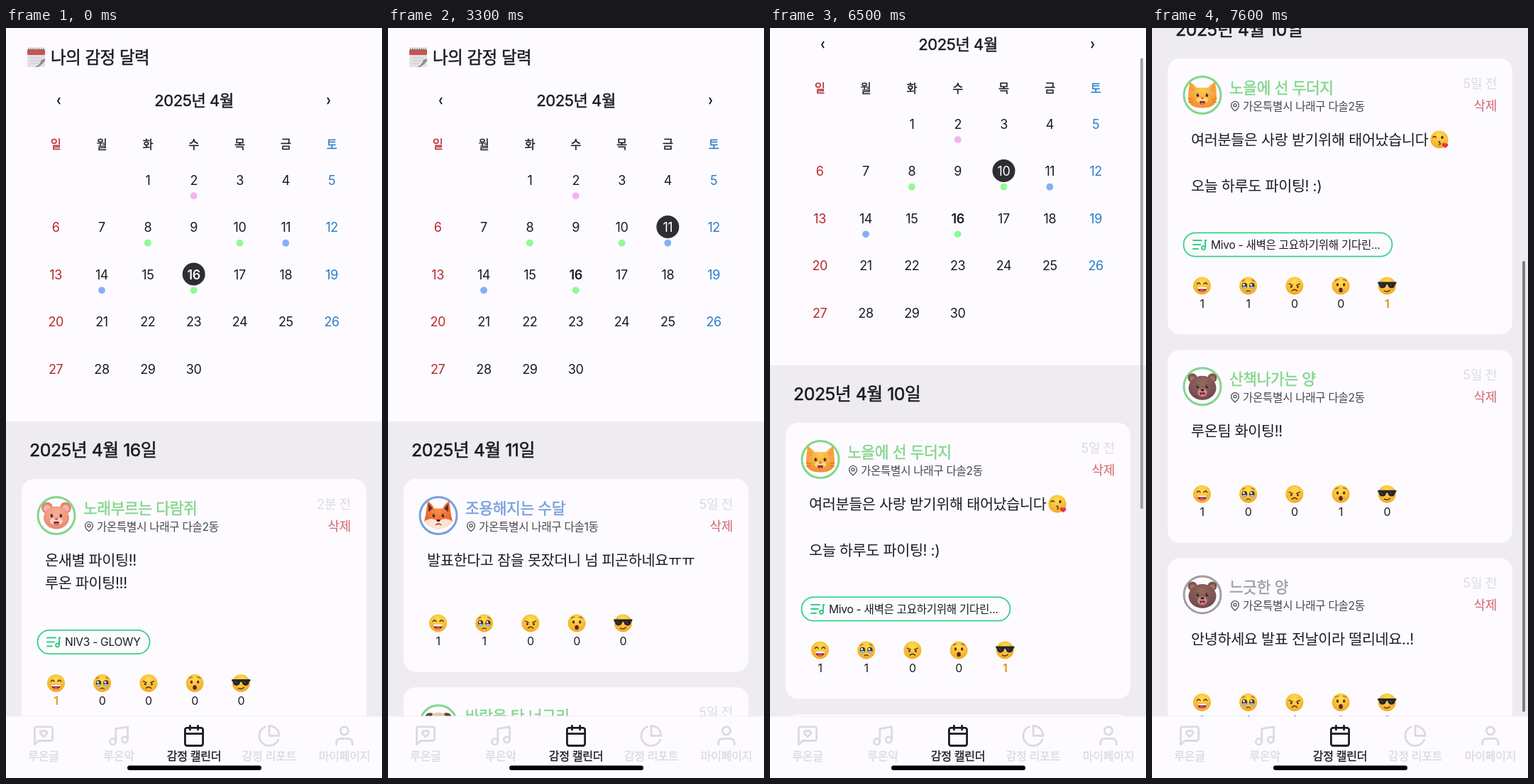
These frames come from a looping animation (530 by 1056 pixels, 7.7 s). An HTML page:

```html
<!DOCTYPE html>
<html lang="ko">
<head>
<meta charset="utf-8">
<style>
html, body { margin: 0; width: 100%; height: 100%; overflow: hidden; background: #fdfbff; }
svg { display: block; width: 530px; height: 1056px; }
text { font-family: Inter, 'Noto Sans CJK KR', 'Noto Sans CJK', 'Noto Sans KR', sans-serif; letter-spacing: -.02em; white-space: pre; }
.medium { stroke-width: .022em; stroke-linejoin: round; }
.card { opacity: var(--o); }
.line { fill: none; stroke-linecap: round; stroke-linejoin: round; }
</style>
</head>
<body>
<svg id="stage" viewBox="0 0 530 1056"></svg>
<script>
const LOOP = 7700, FRAME = 100;
const INK = '#1c1b1f', PAPER = '#fdfbff', PANEL = '#eeecef', RED = '#b9282c', BLUE = '#2b7ccb';
const GREEN = '#83d68c', SKY = '#789fdb', GREY = '#a09ea2';
const stage = document.getElementById('stage');

// drawing helpers
const oval = (x, y, rx, ry, fill) => `<ellipse cx="${x}" cy="${y}" rx="${rx}" ry="${ry}" fill="${fill}"/>`;
const dot = (x, y, r, fill) => oval(x, y, r, r, fill);
const pair = (x, y, rx, ry, fill) => oval(-x, y, rx, ry, fill) + oval(x, y, rx, ry, fill);
const box = (x, y, w, h, r, fill, more = '') => `<rect x="${x}" y="${y}" width="${w}" height="${h}" rx="${r}" fill="${fill}" ${more}/>`;
const area = (d, fill) => `<path d="${d}" fill="${fill}"/>`;
const line = (d, color, w) => `<path class="line" d="${d}" stroke="${color}" stroke-width="${w}"/>`;
const at = (x, y, inner) => `<g transform="translate(${x} ${y})">${inner}</g>`;
const put = (id, x, y) => `<use href="#${id}" x="${x}" y="${y}"/>`;
const label = (x, cy, size, str, fill = INK, anchor = 'start', more = '') =>
  `<text x="${x}" y="${cy + size * .37}" font-size="${size}" fill="${fill}" text-anchor="${anchor}" ${more}>${str}</text>`;
// a thin outline gives the weight between regular and bold
const medium = (x, cy, size, str, fill = INK, anchor = 'start', more = '') =>
  label(x, cy, size, str, fill, anchor, `class="medium" stroke="${fill}" ${more}`);
const ring = (x, y, r, color, w) => `<circle cx="${x}" cy="${y}" r="${r}" fill="none" stroke="${color}" stroke-width="${w}"/>`;
const fade = (id, a, b) => `<radialGradient id="${id}" cx=".5" cy=".3" r=".75"><stop offset="0" stop-color="${a}"/><stop offset="1" stop-color="${b}"/></radialGradient>`;

// reaction faces
const ball = dot(0, 0, 12.5, 'url(#yellow)');
const DARK = '#4a2f25';
const faces = {
  grin: ball + line('M-7 -2.5q2.2 -3.4 4.4 0M2.6 -2.5q2.2 -3.4 4.4 0', DARK, 1.5) +
    area('M-7 2H7Q6 8.6 0 8.6T-7 2z', '#7c1f2d') + area('M-6.8 2H6.8L6 4.4H-6z', '#fff') + oval(0, 7, 3.2, 1.4, '#f0566b'),
  moved: ball + pair(5.2, 0, 3.7, 4.2, DARK) + pair(5.2, 2.6, 3.1, 1.8, '#7fc4f2') +
    dot(-6.2, -1.6, 1.5, '#fff') + dot(4.2, -1.6, 1.5, '#fff') +
    line('M-8.5 -6.5l3.6 -2M8.5 -6.5l-3.6 -2', '#8a5a24', 1.1) + line('M-2.6 7.8q2.6 -2 5.2 0', DARK, 1.2),
  angry: ball + line('M-7.6 -2.8l4.8 2M7.6 -2.8l-4.8 2', DARK, 1.3) + pair(4.6, 1.2, 1.4, 1.7, DARK) + line('M-3.6 7q3.6 -3.6 7.2 0', DARK, 1.4),
  hush: ball + pair(4.6, -1.6, 1.6, 2.2, DARK) + oval(0, 6, 2.8, 3.3, '#5b2526') +
    line('M-7.6 -7q1.8 -2.2 4.2 -1.5M7.6 -7q-1.8 -2.2 -4.2 -1.5', '#8a5a24', 1.2),
  cool: ball + area('M-13 -5.5H13V-2.8L11.5 -2.3Q11 3.4 6.5 3.4T1 -1.8H-1Q-2 3.4 -6.5 3.4T-11.5 -2.3L-13 -2.8z', '#26252b') +
    line('M-8.5 -3l2.5 3.4M4 -3l2.5 3.4', '#55535e', 1) + line('M-4 7q4.5 2.6 8 -1', DARK, 1.4),
  kiss: ball + line('M-9 -3q2.3 -2.4 4.5 0', DARK, 1.5) + oval(4, -3, 1.6, 2.2, DARK) +
    line('M-1 3q3 0 1 1.8q3 1 0 2.8', DARK, 1.3) + area('M8 12q-5 -3 -4 -6q2 -3 4 0q3 -2 4.5 1q0 3 -4.5 5z', '#e7354b')
};

// animal portraits
const eyes = pair(6.5, 0, 1.8, 2.4, '#2d1b1d') + dot(-6, -1, .7, '#fff') + dot(7, -1, .7, '#fff');
const smile = area('M-4 8.5H4Q3.5 13.4 0 13.4T-4 8.5z', '#842338') + oval(0, 12, 2.2, 1.2, '#f3788a');
const catHead = 'M-18 -18Q-15 -18 -8 -10.5H8Q15 -18 18 -18Q20 -6 20 4Q20 18 0 18T-20 4Q-20 -6 -18 -18z';
const animals = {
  mouse: pair(13, -11, 8, 8, '#df8771') + pair(13, -10, 5, 5, '#f8b4ac') + oval(0, 3, 18, 16, 'url(#peach)') +
    pair(4, 8, 5, 4, '#fad3c5') + eyes + oval(0, 5, 2.2, 1.6, '#d95a73') + smile,
  cat: area(catHead, 'url(#gold)') + area('M-16 -14l6 6l-6 4zM16 -14l-6 6l6 4z', '#f49a4c') +
    pair(3.6, 7, 4.4, 3.4, '#ffd284') + eyes + oval(0, 4.5, 1.8, 1.3, '#d9603f') + smile +
    line('M-20 5l6 1M-20 10l6 -1M20 5l-6 1M20 10l-6 -1', '#c6702b', .9),
  fox: area('M-15 -20Q-9 -17 -6 -10H6Q9 -17 15 -20Q17 -9 18 0L20 8Q12 18 0 19Q-12 18 -20 8L-18 0Q-17 -9 -15 -20z', 'url(#rust)') +
    area('M-14 -17l6 7l-6 5zM14 -17l-6 7l6 5z', '#6a2b2b') + area('M-20 8Q-10 1 0 8Q10 1 20 8Q11 19 0 19T-20 8z', '#ffe3cf') +
    eyes + oval(0, 7, 2.5, 1.8, '#35201f') + line('M-3.4 13q3.4 -3 6.8 0', '#7a2a2e', 1.4),
  bear: pair(14, -12, 6.5, 6.5, '#7d564b') + pair(14, -11, 3.5, 3.5, '#a8736b') + oval(0, 2, 19.5, 17, 'url(#cocoa)') +
    oval(0, 8.5, 6.6, 6, '#c98f86') + eyes + oval(0, 5, 2.6, 1.7, '#35201f') + smile,
  dog: oval(0, 2, 17, 18, '#e9c6a0') + area('M-8 -15Q-20 -18 -20 -2Q-15 2 -11 -6zM8 -15Q20 -18 20 -2Q15 2 11 -6z', '#5d423f') +
    eyes + oval(0, 5, 3.6, 2.4, '#35201f') + smile
};

const define = set => Object.entries(set).map(([id, art]) => `<g id="${id}">${art}</g>`).join('');
const defs = '<defs>' + fade('yellow', '#ffdc52', '#f4a51f') + fade('peach', '#f8b296', '#e58569') +
  fade('gold', '#ffcb4c', '#f28a2e') + fade('rust', '#fb9142', '#e2512b') + fade('cocoa', '#96695a', '#6b4653') +
  define(faces) + define(animals) + '</defs>';

// posts
const reactions = ['grin', 'moved', 'angry', 'hush', 'cool'];
const pin = `<g transform="translate(117 67) scale(.67) translate(-12 -12)">` +
  line('M20 10c0 6-8 12-8 12s-8-6-8-12a8 8 0 0 1 16 0z', '#555358', 2) + ring(12, 10, 3, '#555358', 2) + '</g>';
const tune = line('M58 -6H70M58 0H68M58 6H65M75 -6V4M75 -6h1.5', '#35cf83', 2) + ring(72.5, 4.5, 2.4, '#35cf83', 2);

function post(p) {
  const base = 114 + 32.5 * (p.text.length - 1);
  const row = base + (p.song ? 141 : 89);
  p.height = row + 68.5;
  let out = box(22, 0, 486, p.height, 17, PAPER, 'class="card"') +
    ring(71, 51.5, 26, p.color, 3) + put(p.face, 71, 51.5) +
    medium(109, 41, 21.5, p.name, p.color) + pin +
    label(128, 67, 15.6, p.place, '#49474c') +
    label(486, 35, 18, p.ago, '#dddbdf', 'end') + label(486, 66, 18, '삭제', '#d4646e', 'end');
  p.text.forEach((s, i) => out += label(55, 114 + 32.5 * i, 20.8, s));
  if (p.kiss) out += put('kiss', 405, 114);
  if (p.song) {
    out += at(0, base + 83, box(44.5, -16.7, p.wide, 33.4, 16.7, 'none', 'stroke="#35d18a" stroke-width="1.8"') +
      tune + label(83, 0, 15.6, p.song));
  }
  reactions.forEach((id, i) => {
    const x = 70.5 + 65.2 * i, mine = p.mine === i;
    out += put(id, x, row) + label(x, row + 25, 16, p.counts[i], mine ? '#e0a02c' : INK, 'middle', mine ? 'font-weight="700"' : '');
  });
  return out;
}

const PLACE = '가온특별시 나래구 다솔2동';
const posts = {
  16: [{ face: 'mouse', color: GREEN, name: '노래부르는 다람쥐', place: PLACE, ago: '2분 전', text: ['온새별 파이팅!!', '루온 파이팅!!!'],
    song: 'NIV3 - GLOWY', wide: 158, counts: [1, 0, 0, 0, 0], mine: 0 }],
  10: [
    { face: 'cat', color: GREEN, name: '노을에 선 두더지', place: PLACE, ago: '5일 전', kiss: true,
      text: ['여러분들은 사랑 받기위해 태어났습니다', '', '오늘 하루도 파이팅! :)'],
      song: 'Mivo - 새벽은 고요하기위해 기다린...', wide: 294, counts: [1, 1, 0, 0, 1], mine: 4 },
    { face: 'bear', color: GREEN, name: '산책나가는 양', place: PLACE, ago: '5일 전', text: ['루온팀 화이팅!!'], counts: [1, 0, 0, 1, 0] },
    { face: 'bear', color: GREY, name: '느긋한 양', place: PLACE, ago: '5일 전', text: ['안녕하세요 발표 전날이라 떨리네요..!'], counts: [0, 1, 1, 0, 0] }
  ],
  11: [
    { face: 'fox', color: SKY, name: '조용해지는 수달', place: '가온특별시 나래구 다솔1동', ago: '5일 전',
      text: ['발표한다고 잠을 못잤더니 넘 피곤하네요ㅠㅠ'], counts: [1, 1, 0, 0, 0] },
    { face: 'dog', color: GREEN, name: '바람을 탄 너구리', place: PLACE, ago: '5일 전', text: [''], counts: [0, 0, 0, 0, 0] }
  ],
  14: [{ face: 'cat', color: SKY, name: '잠잠해진 두더지', place: '가온특별시 마루구 바람2동', ago: '2일 전',
    text: ['온새별 안녕..이제 마지막 만남 하러 가는길'], counts: [0, 0, 0, 0, 0] }]
};

function list(day) {
  let y = 635;
  const cards = posts[day].map(p => {
    const g = at(0, y, post(p));
    y += p.height + 21.7;
    return g;
  });
  return `<g id="list${day}">${cards.join('')}</g>`;
}

// calendar
const colX = c => 70.2 + 64.83 * c, rowY = r => 214 + 66.55 * r;
const cell = d => [colX((d + 1) % 7), rowY(Math.floor((d + 1) / 7))];
const tint = c => c === 0 ? RED : c === 6 ? BLUE : INK;
const moods = { 2: '#f5b4f1', 8: '#8ffb93', 10: '#8ffb93', 11: '#86aff6', 14: '#86aff6', 16: '#8ffb93' };

function calendar() {
  let out = at(29, 27,
    box(1, 3, 25, 25, 1.5, '#e4e2e6') + box(1, 3, 25, 8, 1.5, '#c8564c') +
    line('M5 15H22M5 19H22M5 23H14', '#cac7cd', 1) + area('M12 28Q19 25 21 18L26 16V19Q22 25 16 28z', '#8e8c92') +
    line(Array.from({ length: 8 }, (_, i) => `M${3 + i * 3} 1V5`).join(''), '#77757b', 1.2)) +
    medium(63, 41, 23.5, '나의 감정 달력') +
    medium(265, 101.5, 22.1, '2025년 4월', INK, 'middle') +
    line('M75.5 98.5L73 102.5L75.5 106.5M453.5 98.5L456 102.5L453.5 106.5', INK, 1.9);
  [...'일월화수목금토'].forEach((s, c) => out += medium(colX(c), 164, 16.5, s, tint(c), 'middle'));
  out += `<circle id="mark" r="16" fill="#2f2d32"/>`;
  for (let d = 1; d <= 30; d++) {
    const [x, y] = cell(d);
    out += label(x, y, 18, d, tint((d + 1) % 7), 'middle', `id="day${d}" font-weight="${d === 16 ? 600 : 400}"`);
    if (moods[d]) out += dot(x, y + 22.2, 4.9, moods[d]);
  }
  return out;
}

// bottom bar
const tabs = [
  ['루온글', c => line('M21 15a2 2 0 0 1-2 2H7l-4 4V5a2 2 0 0 1 2-2h14a2 2 0 0 1 2 2zM14.8 7.5a1.84 1.84 0 0 0-2.6 0l-.2.3-.3-.3a1.84 1.84 0 1 0-2.4 2.8L12 13l2.7-2.7c.9-.9.8-2.1.1-2.8', c, 2)],
  ['루온악', c => line('M9 18V5l12-2v13', c, 2) + ring(6, 18, 3, c, 2) + ring(18, 16, 3, c, 2)],
  ['감정 캘린더', c => box(3, 4, 18, 18, 2, 'none', `stroke="${c}" stroke-width="2"`) + line('M16 2v4M8 2v4M3 10h18', c, 2)],
  ['감정 리포트', c => line('M21.21 15.89A10 10 0 1 1 8 2.83M22 12A10 10 0 0 0 12 2v10z', c, 2)],
  ['마이페이지', c => line('M20 21v-2a4 4 0 0 0-4-4H8a4 4 0 0 0-4 4v2', c, 2) + ring(12, 7, 4, c, 2)]
];
const bar = box(0, 969, 530, 90, 0, PAPER) + box(0, 968.5, 530, 1, 0, '#f1eff3') + tabs.map(([name, icon], i) => {
  const x = 53 + 106 * i, c = i === 2 ? INK : '#dcdadf';
  return `<g transform="translate(${x} 996.5) scale(1.4) translate(-12 -12)">${icon(c)}</g>` +
    medium(x, 1025.5, 16.1, name, c, 'middle');
}).join('');

stage.innerHTML = defs + box(0, 0, 530, 1056, 0, PAPER) +
  `<g id="page">${box(0, 554, 530, 1600, 0, PANEL)}${calendar()}${medium(33, 593.5, 24.9, '', INK, 'start', 'id="heading"')}` +
  Object.keys(posts).map(list).join('') + '</g>' +
  `<rect id="thumb" x="522" width="4" height="635" rx="2" fill="#7f7d82"/><g id="bar">${bar}</g>` +
  box(171, 1038.4, 189, 6.6, 3.3, '#000');

const $ = id => document.getElementById(id);

// each visit: tap, old posts gone, new posts arrive
const visits = [
  { day: 16, tap: -900, gone: -800, show: -700 },
  { day: 10, tap: 1700, gone: 1850, show: 2000 },
  { day: 11, tap: 2700, gone: 2850, show: 2900 },
  { day: 14, tap: 4300, gone: 4450, show: 4700 },
  { day: 10, tap: 5800, gone: 5950, show: 6100 }
];

function render(t) {
  const n = visits.filter(v => v.tap <= t).length - 1, v = visits[n];
  let shown = v.day, o = 0, head = 1;
  if (t < v.gone) {
    shown = visits[n - 1].day;
    o = 1 - (t - v.tap) / (v.gone - v.tap);
  } else if (t >= v.show) {
    o = head = Math.min(1, (t - v.show + FRAME) / 300);
  } else head = 0;

  for (const day in posts) {
    const g = $('list' + day), a = +day === shown ? o : 0;
    g.setAttribute('opacity', a);
    g.setAttribute('display', a ? 'inline' : 'none');
    g.style.setProperty('--o', a);
    $('day' + day).setAttribute('fill', +day === v.day ? '#fff' : INK);
  }
  const [x, y] = cell(v.day);
  $('mark').setAttribute('cx', x);
  $('mark').setAttribute('cy', y - .6);
  $('heading').textContent = `2025년 4월 ${v.day}일`;
  $('heading').setAttribute('opacity', head);

  const u = Math.max(0, (t - 6400) / 1200);
  const scroll = Math.round(592 * (1 - Math.pow(Math.max(0, 1 - u), 1.645)));
  $('page').setAttribute('transform', `translate(0 ${-scroll})`);
  $('thumb').setAttribute('y', 328 + (scroll - 592) * .557);
  $('thumb').setAttribute('opacity', Math.min(1, u * 8));

  // the bar sits a pixel higher while the page is too short to scroll
  const short = !o || shown === 14;
  $('bar').setAttribute('transform', `translate(0 ${short ? -1 : 0})`);
}

const start = performance.now();
function tick() {
  const t = (performance.now() - start) % LOOP;
  render(Math.floor(t / FRAME) * FRAME);
  requestAnimationFrame(tick);
}
tick();
</script>
</body>
</html>
```
